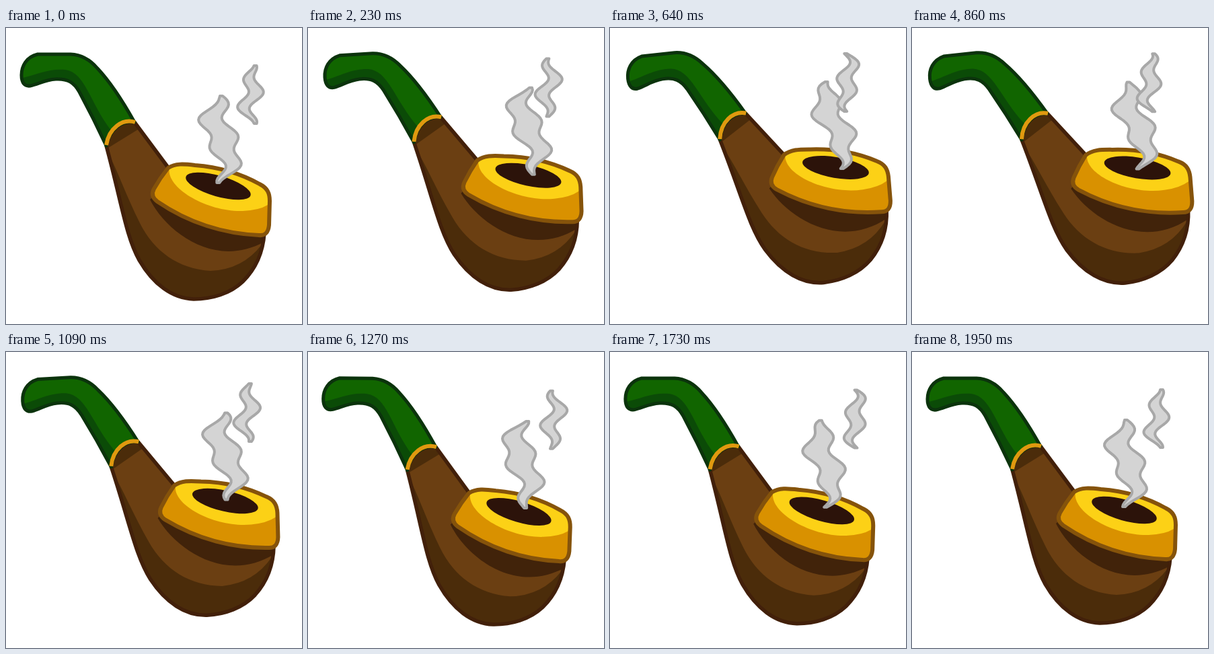
Animation, 440 px wide and 440 px high, one loop 1.99 s. Source, as an HTML page:

```html
<!DOCTYPE html>
<html lang="en">
<head>
<meta charset="utf-8">
<title>Smoking pipe</title>
<style>
  html, body { margin: 0; width: 100%; height: 100%; overflow: hidden; background: #fff; }
  svg { display: block; width: 100vw; height: 100vh; }
  .smoke { fill: #d4d4d4; stroke: #a8a8a8; stroke-width: 4; stroke-linejoin: round; }
</style>
</head>
<body>
<svg viewBox="0 0 440 440">
  <defs>
    <path id="stem" d="M191 140C172 106 152 77 136 60Q119 40 96 39L47 39C30 43 23 57 23 70C23 82 28 87 36 86C49 83 58 77 74 76C92 75 101 81 109 95Q130 134 149 175C154 152 170 137 191 140Z"/>
    <path id="wood" d="M191 140L243 210L384 305C382 333 373 356 352 377C333 395 306 403 279 403C247 402 219 381 198 345C178 309 172 260 149 175C154 152 170 137 191 140Z"/>
    <path id="rim" d="M241 208C252 201 264 202 281 204C320 207 350 217 377 232C389 238 392 246 392 257L391 293C390 304 385 309 376 308C325 306 272 290 225 258Q214 250 220 239Q229 223 241 208Z"/>
    <clipPath id="inStem"><use href="#stem"/></clipPath>
    <clipPath id="inWood"><use href="#wood"/></clipPath>
    <clipPath id="inRim"><use href="#rim"/></clipPath>
  </defs>
  <g id="pipe" fill="none" stroke-linejoin="round">
    <use href="#wood" fill="#4b2c0a"/>
    <g clip-path="url(#inWood)">
      <path fill="#6b3f12" d="M149 180C166 212 178 248 199 290C220 332 256 358 304 361Q352 359 380 322L390 290L230 130Z"/>
      <path fill="#41230a" d="M214 255C240 306 316 362 392 313L390 290L240 230Z"/>
    </g>
    <use href="#wood" stroke="#42200a" stroke-width="5.500"/>
    <use href="#stem" fill="#116500"/>
    <path clip-path="url(#inStem)" fill="#0b4b07" d="M20 75C46 70 62 60 88 62C118 66 124 110 156 152L149 180L90 92L30 95Z"/>
    <use href="#stem" stroke="#0b330c" stroke-width="5"/>
    <path stroke="#e0990f" stroke-width="6" d="M192 140C173 134 153 149 149 174"/>
    <use href="#rim" fill="#d99100"/>
    <path clip-path="url(#inRim)" fill="#fcd116" d="M243 208C237 238 300 274 352 272Q376 271 389 263L395 235L300 195Z"/>
    <use href="#rim" stroke="#85530b" stroke-width="6"/>
    <ellipse cx="315.500" cy="235" rx="50" ry="15.500" transform="rotate(16 315.500 235)" fill="#2c130a"/>
  </g>
  <path id="plume" class="smoke"/>
  <path id="wisp" class="smoke"/>
</svg>
<script>
const LOOP = 1990, STEPS = 44, WAVE = 22;
const el = id => document.getElementById(id);
const sin = turns => Math.sin(2 * Math.PI * turns);

function ease(u) {
  u = Math.min(1, Math.max(0, u));
  return u * u * (3 - 2 * u);
}

// Lift, hold, drop, then a fading bounce
function tiltAt(k) {
  const bounce = k > 25 ? .2 * sin((k - 25) / 12) * (STEPS - k) / 19 : 0;
  return ease(k / 9) - ease((k - 18) / 12) - bounce;
}

// A closed ribbon from top to bottom; mid and half give its centre and half width at u
function ribbon(id, top, height, mid, half) {
  const left = [], right = [];
  for (let i = 0; i <= 40; i++) {
    const u = i / 40, x = mid(u), y = top + height * u;
    left.unshift([x - half(u), y]);
    right.push([x + half(u), y]);
  }
  el(id).setAttribute("d", "M" + right.concat(left).map(p => p.map(v => v.toFixed(2))).join("L") + "Z");
}

function frame() {
  const k = Math.floor(performance.now() % LOOP / LOOP * STEPS);
  const s = tiltAt(k), turn = k / WAVE;
  el("pipe").setAttribute("transform", `rotate(${-6.3 * s} 75 40)`);
  ribbon("plume", 101 - 21 * s, 129,
    u => 320 + 2 * u - 10 * sin(u) + 7 * sin(turn + 2.8 * u) + s * (7 + 13 * u),
    u => 2 + 18 * sin(u ** .85 / 2));
  ribbon("wisp", 56 - 18 * s, 86,
    u => 364 + 4 * sin(u) + 7 * sin(turn + .3 + 2 * u) - 11 * s,
    u => 2 + 9 * sin(u / 2));
  requestAnimationFrame(frame);
}
frame();
</script>
</body>
</html>
```
